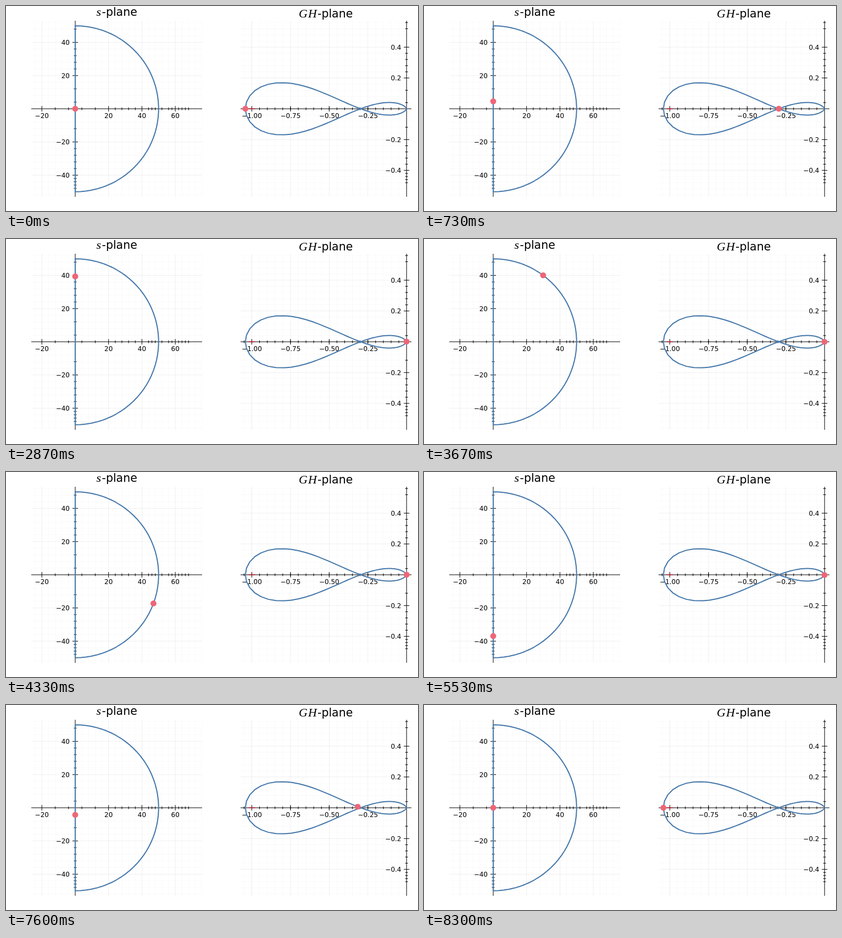
Write an HTML page that moves like this. It is 750 px wide and 375 px high and loops after 8330 ms.

```html
<!DOCTYPE html>
<html lang="en">
<head>
<meta charset="utf-8">
<title>Nyquist plot</title>
<style>
  html, body { margin: 0; width: 100%; height: 100%; overflow: hidden; background: #fff; }
  svg { display: block; width: 750px; height: 375px; }
  text { font: 12px "DejaVu Sans", sans-serif; }
  .title { font-size: 20.5px; }
  .math { font: italic 22px "Liberation Serif", serif; }
</style>
</head>
<body>
<svg id="stage" viewBox="0 0 750 375"></svg>
<script>
const LOOP = 8330;
const STEPS = 50;
const BLUE = '#4477aa', PINK = '#ee6677';
const TOP = 27, BOTTOM = 349;
const stage = document.getElementById('stage');

function add(tag, attrs, text) {
  const el = document.createElementNS('http://www.w3.org/2000/svg', tag);
  for (const key in attrs) el.setAttribute(key, attrs[key]);
  if (text !== undefined) el.textContent = text;
  stage.appendChild(el);
  return el;
}

const line = (x1, y1, x2, y2, stroke = '#000', opacity = 1, width = 1) =>
  add('line', { x1, y1, x2, y2, stroke, 'stroke-opacity': opacity, 'stroke-width': width });

const label = (x, y, text, anchor) => add('text', { x, y, 'text-anchor': anchor }, text);

const range = (from, to, step) =>
  Array.from({ length: Math.round((to - from) / step) + 1 }, (_, i) => from + i * step);

const sPlane = {
  left: 46, right: 357, ox: 126, oy: 188, scale: 3.036,
  xMajor: [-20, 20, 40, 60], yMajor: [-40, -20, 20, 40], digits: [0, 0],
  xMinor: [-12, -4, 4, 12, ...range(24, 36, 4), 44, 46, ...range(48, 56, 4), 58, ...range(62, 68, 2)],
  yMinor: [48, 36, 32, 28, 24, 12, 4, -12, ...range(-36, -24, 4), ...range(-48, -42, 2)],
  xStep: 4, yStep: 4, labelX: 116
};

const ghPlane = {
  left: 427, right: 738, ox: 729.2, oy: 188, scale: 281.7,
  xMajor: [-1, -0.75, -0.5, -0.25], yMajor: [-0.4, -0.2, 0.2, 0.4], digits: [2, 1],
  xMinor: range(-1.05, -0.05, 0.05),
  yMinor: [0.56, 0.52, 0.36, 0.32, 0.28, 0.24, 0.12, 0.04, -0.12,
    ...range(-0.36, -0.24, 0.04), ...range(-0.48, -0.42, 0.02)],
  xStep: 0.05, yStep: 0.04, labelX: 719.5
};

const toX = (p, v) => p.ox + v * p.scale;
const toY = (p, v) => p.oy - v * p.scale;
const format = (v, digits) => v.toFixed(digits).replace('-', '\u2212');

function drawGrid(p) {
  const column = (x, opacity) => x > p.left && x < p.right && line(x, TOP, x, BOTTOM, '#000', opacity);
  const row = (y, opacity) => y > TOP && y < BOTTOM && line(p.left, y, p.right, y, '#000', opacity);
  for (let i = -30; i <= 30; i++) {
    column(toX(p, i * p.xStep), 0.025);
    row(toY(p, i * p.yStep), 0.025);
  }
  p.xMajor.forEach(v => column(toX(p, v), 0.045));
  p.yMajor.forEach(v => row(toY(p, v), 0.045));
}

function drawAxes(p) {
  const xTick = (v, h) => line(toX(p, v), p.oy - h, toX(p, v), p.oy + h);
  const yTick = (v, h) => line(p.ox - h, toY(p, v), p.ox + h, toY(p, v));
  line(p.left, p.oy, p.right, p.oy);
  line(p.ox, TOP, p.ox, BOTTOM);
  p.xMinor.forEach(v => xTick(v, 2.5));
  p.yMinor.forEach(v => yTick(v, 2.5));
  p.xMajor.forEach(v => {
    xTick(v, 5);
    label(toX(p, v), 205.3, format(v, p.digits[0]), 'middle');
  });
  p.yMajor.forEach(v => {
    yTick(v, 5);
    label(p.labelX, toY(p, v) + 4.4, format(v, p.digits[1]), 'end');
  });
}

// Contour: up the imaginary axis, around the right half-plane, back up to zero.
function contour(frame) {
  const u = (frame % STEPS) / (STEPS - 1);
  const angle = Math.PI * (0.5 - u);
  return [
    [0, 10 * u],
    [0, 10 + 40 * u],
    [50 * Math.cos(angle), 50 * Math.sin(angle)],
    [0, -50 + 40 * u],
    [0, -10 + 10 * u]
  ][Math.floor(frame / STEPS)];
}

// GH(s) = 100 / ((s - 2)(s + 6)(s + 8))
function transfer([re, im]) {
  let a = 1, b = 0;
  for (const pole of [2, -6, -8]) {
    const d = re - pole;
    [a, b] = [a * d - b * im, a * im + b * d];
  }
  const k = 100 / (a * a + b * b);
  return [a * k, -b * k];
}

const path = range(0, 5 * STEPS - 1, 1).map(contour);
const image = path.map(transfer);

const drawCurve = (p, points) => add('polyline', {
  points: points.map(([x, y]) => toX(p, x).toFixed(2) + ',' + toY(p, y).toFixed(2)).join(' '),
  fill: 'none', stroke: BLUE, 'stroke-width': 2, 'stroke-linejoin': 'round'
});

[sPlane, ghPlane].forEach(p => { drawGrid(p); drawAxes(p); });

add('text', { x: 164.5, y: 18, class: 'math' }, 's');
add('text', { x: 174.5, y: 18, class: 'title' }, '-plane');
add('text', { x: 533, y: 21, class: 'math' }, 'G');
add('text', { x: 550, y: 21, class: 'math' }, 'H');
add('text', { x: 567, y: 21, class: 'title' }, '-plane');

drawCurve(sPlane, path);
drawCurve(ghPlane, image);

const critical = toX(ghPlane, -1);
line(critical - 6, 188, critical + 6, 188, '#e8102a', 1, 1.2);

const dots = [sPlane, ghPlane].map(() => add('circle', { r: 5.4, fill: PINK }));

function place(dot, p, [x, y]) {
  dot.setAttribute('cx', toX(p, x));
  dot.setAttribute('cy', toY(p, y));
}

// Thirty steps a second, with start times rounded to hundredths.
function render(time) {
  const ticks = Math.floor((time % LOOP) / 10);
  const frame = Math.min(Math.floor((3 * ticks + 1) / 10), path.length - 1);
  place(dots[0], sPlane, path[frame]);
  place(dots[1], ghPlane, image[frame]);
}

const start = performance.now();
function tick() {
  render(performance.now() - start);
  requestAnimationFrame(tick);
}
render(0);
requestAnimationFrame(tick);
</script>
</body>
</html>
```
